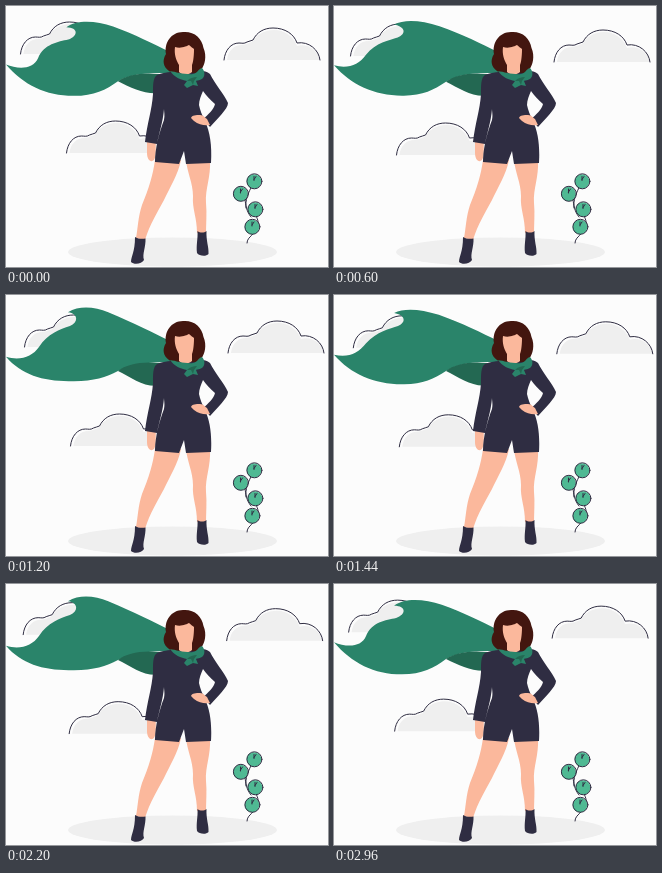
Recreate the animation shown at these times as an HTML page. Size 322x261 px, loop 3000 ms.

```html
<!DOCTYPE html>
<html lang="en">
<head>
<meta charset="utf-8">
<title>Caped woman</title>
<style>
html, body { margin: 0; width: 100%; height: 100%; overflow: hidden; background: #fcfcfc; }
svg { display: block; width: 322px; height: 261px; }
.ink { fill: #2f2d42; }
.skin { fill: #fbb89c; }
.green { fill: #2a846a; }
.shade { fill: #236852; }
.hair { fill: #43160f; }
.pale { fill: #efefef; }
.line { fill: none; stroke: #2f2d42; stroke-width: 1; stroke-linecap: round; }
</style>
</head>
<body>
<svg viewBox="0 0 322 261">
  <defs>
    <g id="cloud">
      <path class="pale" d="M3 0C4 -9 10 -15 18 -15C21 -15 24 -17 28 -18C33 -26 41 -30 50 -30C61 -30 70 -23 73 -14C84 -17 93 -10 96 0Z"/>
      <path class="line" d="M0 0C1 -10 7 -17 15 -17C18 -17 20 -16 23 -18C25 -19 27 -19 29 -20C33 -28 40 -32 49 -32C61 -32 70 -26 73 -17C85 -19 95 -10 96 0"/>
    </g>
    <g id="berry">
      <circle r="7.3" fill="#4fb993"/>
      <circle class="line" r="7.5" cx=".4" cy="-.2"/>
      <path class="line" d="M0 -1V-5M0 -2L2 -5"/>
    </g>
  </defs>

  <g id="sky">
    <use href="#cloud" x="14.5" y="48"/>
    <use href="#cloud" x="218" y="54"/>
    <use href="#cloud" x="60.5" y="147"/>
  </g>
  <ellipse class="pale" cx="166.5" cy="246" rx="104.5" ry="14.5"/>

  <path id="cape" class="green"/>
  <path id="fold" class="shade"/>

  <!-- plant -->
  <path class="line" d="M241 237C241 230 250 229 252 219C253 214 250 212 249 205M245 211C240 205 240 199 239 194M240 202C239 194 242 187 247 178"/>
  <use href="#berry" x="248" y="175.5"/>
  <use href="#berry" x="234.5" y="188"/>
  <use href="#berry" x="249" y="203.5"/>
  <use href="#berry" x="246" y="221"/>

  <!-- legs and boots -->
  <path class="skin" d="M149 154L175 154C172 169 164 181 158 194C151 207 144 218 139 234L130 232C132 222 132 211 136 199C143 182 147 169 149 154Z"/>
  <path class="skin" d="M180 154H204C205 171 199 183 200 197C201 207 200 217 200 228L191 227C191 211 186 203 187 190C187 177 181 166 180 154Z"/>
  <path class="ink" d="M129 231C132 233 136 233 139.500 232.500C140 241 136 248 138 254C136 258 128 259 125 256C125 250 129 246 129 231Z"/>
  <path class="ink" d="M191.500 225C194 227 198 227 200.500 225C200 235 203 241 202.500 248C200 251 193 250 191 247C190 239 192 233 191.500 225Z"/>

  <!-- hands, outfit -->
  <path class="skin" d="M141 135H150C149 141 151 149 148 154C145 157 141 154 141 147Z"/>
  <path class="ink" d="M151 69C158 66 166 66 173 65H188C194 65 200 64 204 68C209 78 218 88 222 97C222 103 211 113 204 121L197 113C202 109 208 103 209 98C204 94 200 89 197 85C195 90 193 94 193 99C194 104 196 109 199 115C204 126 206 139 205 157L180 158L178 145L173 158L149 156C149 143 153 127 158 114C159 109 158 106 158 103C157 116 153 127 151 138L139 136C141 118 146 104 147 88C147 78 147 72 151 69Z"/>
  <path class="skin" d="M204 119C199 120 193 119 188 115L185 112C186 109 190 109 194 109C198 109 199 112 201 113Z"/>

  <!-- head and scarf -->
  <path class="hair" d="M177 26C188 25 196 32 197.500 42C201 50 199 59 195 64C190 70 182 66 179 63C174 68 168 69 163 65C157 61 156 54 160 48C158 37 165 26 177 26Z"/>
  <path class="skin" d="M169 41C175 43 181 40 183 39C185 41 187 42 188 43C188 51 187 57 186 59V66C181 70 176 69 173 66V59C170 54 168 48 169 41Z"/>
  <path class="green" d="M164 65C170 66 180 69 187 68C192 67 192 63 196 62C199 65 199 70 197 72C194 75 191 74 190 75L192 80L187 79L181 82L178 79L181 75C175 74 168 71 164 65Z"/>
  <path class="shade" d="M181 75C184 72 187 71 191 71L188 75L187 79L185 75Z"/>
</svg>
<script>
const LOOP = 3000, FLAP = 1000, STEP = 40, DRIFT = 5;
const get = id => document.getElementById(id);

// Cape poses: at = flap phase, top = upper hem, edge = lower and left hem, low = fold depth
const poses = [
  { at: -0.08, low: 86.5, top: [60,22, 70,14, 90,15, 108,21],
    edge: [128,66, 112,75, 100,84, 88,90.5, 68,90.5, 40,90.5, 18,79, 0,58,
           12,63, 27,64, 32,52, 37,38, 52,36, 62,34, 72,31, 73,22, 60,22] },
  { at: 0.24, low: 91, top: [62,17, 74,10, 89,12, 102,17],
    edge: [128,68, 112,76, 100,82, 88,86, 68,86, 40,87, 16,81, 0,62,
           14,66, 26,62, 33,52, 42,39, 54,34, 64,31, 73,27, 72,18, 62,17] },
  { at: 0.48, low: 90.5, top: [60,18, 70,13, 86,14, 105,20],
    edge: [128,66, 112,76, 100,84, 88,90, 68,89.5, 40,89, 17,79, 0,59.5,
           14,63, 24,58, 32,48, 43,36, 56,34, 64,31, 73,27, 71,20, 60,18] }
];

const blend = (a, b, k) => a.map((v, i) => v + (b[i] - v) * k);

function capeAt(phase) {
  const p = phase >= 0.92 ? phase - 1 : phase;
  const i = p < poses[1].at ? 0 : p < poses[2].at ? 1 : 2;
  const a = poses[i], b = poses[(i + 1) % 3];
  const end = i === 2 ? b.at + 1 : b.at;
  const k = (1 - Math.cos(Math.PI * (p - a.at) / (end - a.at))) / 2;
  return {
    top: blend(a.top, b.top, k),
    edge: blend(a.edge, b.edge, k),
    low: a.low + (b.low - a.low) * k
  };
}

function draw(time) {
  const t = Math.floor((time % LOOP) / STEP) * STEP;
  const shift = DRIFT * (1 - Math.abs(1 - 2 * t / LOOP));
  get('sky').setAttribute('transform', `translate(${shift} ${shift})`);

  const { top, edge, low } = capeAt((t % FLAP) / FLAP);
  get('cape').setAttribute('d',
    `M${top.slice(0, 2)}C${top.slice(2)} 128 28 148 38 164 46L175 68C150 66 ${edge}Z`);
  const y = edge[3];
  get('fold').setAttribute('d',
    `M112 ${y}C122 68 142 65 165 70L160 ${low + 2}L149 ${low}C136 ${low} 124 ${y + 6} 112 ${y}Z`);
}

const start = performance.now();
function tick() {
  draw(performance.now() - start);
  requestAnimationFrame(tick);
}
tick();
</script>
</body>
</html>
```
